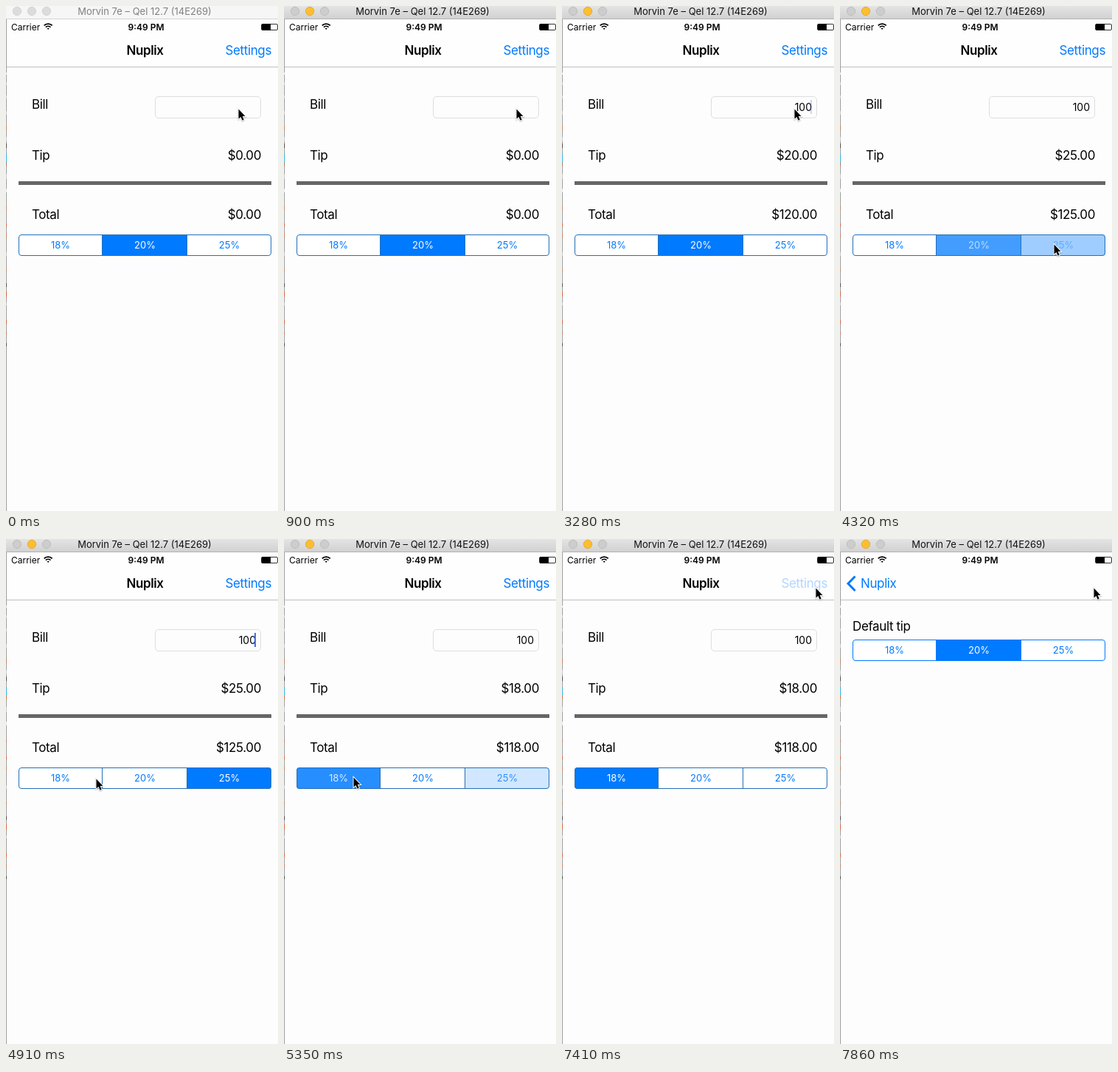
Write an HTML page with a canvas that moves like this. It is 369 px wide and 683 px high and loops after 8 s.

```html
<!DOCTYPE html>
<html lang="en">
<head>
<meta charset="utf-8">
<title>Tip calculator</title>
<style>
  html, body { margin: 0; width: 100%; height: 100%; overflow: hidden; background: #fefefe; }
  canvas { display: block; width: 369px; height: 683px; }
</style>
</head>
<body>
<canvas id="stage"></canvas>
<script>
const W = 369, H = 683, LOOP = 8000;
const BLUE = '#007aff', APP = 'Nuplix';
const FOCUS = 900, TICK = 148.2;
const RATES = [18, 20, 25];
const KEYS = [2220, 2520, 2670];
const TAPS = [{ at: 4243, pick: 2 }, { at: 5141, pick: 0 }];
const PUSH = 7571;

// Each move is a curve from the previous resting place through a bend.
const HOME = [315, 139];
const MOVES = [
  { at: 3420, ms: 440, bend: [235, 240], to: [290, 322] },
  { at: 4460, ms: 580, bend: [190, 331], to: [94, 322] },
  { at: 5494, ms: 870, bend: [400, 120], to: [344, 66] }
];

const canvas = document.getElementById('stage');
const ctx = canvas.getContext('2d');
const dpr = window.devicePixelRatio || 1;
canvas.width = W * dpr;
canvas.height = H * dpr;

const clamp = v => Math.min(1, Math.max(0, v));
const smooth = p => p * p * (3 - 2 * p);

// The screen refreshes at a slow, even rate.
const sample = t => FOCUS + TICK * Math.floor((t - FOCUS + 15) / TICK);

function caretAlpha(t) {
  if (t < 1190) return 0;
  if (t > KEYS[0] && t < 3100) return 1;
  const peak = t < KEYS[0] ? 1200 : 2950;
  return clamp(.75 + 1.1 * Math.cos((t - peak) / 1004 * 2 * Math.PI));
}

function cursorAt(t) {
  let pos = HOME;
  for (const { at, ms, bend, to } of MOVES) {
    const p = smooth(clamp((t - at) / ms)), q = 1 - p;
    pos = pos.map((v, i) => q * q * v + 2 * p * q * bend[i] + p * p * to[i]);
  }
  return pos.map(Math.round);
}

function segmentLevels(t) {
  let levels = [0, 1, 0];
  for (const { at, pick } of TAPS) {
    if (t < at - 90) break;
    const p = clamp((t - at) / 250);
    levels = levels.map((v, i) => i === pick ? .15 + .85 * p : v * (1 - p));
  }
  return levels;
}

function tipRate(t) {
  const done = TAPS.filter(tap => t >= tap.at);
  return RATES[done.length ? done[done.length - 1].pick : 1];
}

function rect(x, y, w, h, color) {
  ctx.fillStyle = color;
  ctx.fillRect(x, y, w, h);
}

function box(x, y, w, h, r, stroke) {
  ctx.beginPath();
  ctx.roundRect(x + .5, y + .5, w - 1, h - 1, r);
  ctx.strokeStyle = stroke;
  ctx.lineWidth = 1;
  ctx.stroke();
}

function text(str, x, y, { size = 17, weight = 400, align = 'left', color = '#000', track = -.38 } = {}) {
  ctx.font = `${weight} ${size}px Inter, "Open Sans", sans-serif`;
  ctx.letterSpacing = track + 'px';
  ctx.textAlign = align;
  ctx.fillStyle = color;
  ctx.fillText(str, x, y);
}

function titleBar(active) {
  const g = ctx.createLinearGradient(0, 0, 0, 17);
  g.addColorStop(0, active ? '#e4e4e4' : '#f6f6f6');
  g.addColorStop(1, active ? '#d1d1d1' : '#f6f6f6');
  rect(0, 0, W, 17, g);
  rect(0, 17, W, 1, active ? '#b3b3b3' : '#d4d4d4');
  for (let i = 0; i < 3; i++) {
    const lit = active && i === 1;
    ctx.beginPath();
    ctx.arc(15 + 20 * i, 7, 5.7, 0, 7);
    ctx.fillStyle = lit ? '#fdbe2f' : active ? '#cdcdcd' : '#dcdcdc';
    ctx.fill();
    ctx.strokeStyle = lit ? '#e0a32c' : active ? '#b9b9b9' : '#cfcfcf';
    ctx.lineWidth = .8;
    ctx.stroke();
  }
  text('Morvin 7e – Qel 12.7 (14E269)', 188, 12,
    { size: 13, align: 'center', color: active ? '#111' : '#808080', track: 0 });
}

function desktopEdge() {
  rect(0, 18, 1, H - 18, '#a0a0a0');
  const colors = ['#d9683c', '#c9825e', '#555', '#c8c8c8', '#e8e8e8'];
  let seed = 7;
  const random = () => (seed = seed * 16807 % 2147483647) / 2147483647;
  for (let y = 90; y < 470; y += 8 + random() * 18) {
    rect(0, Math.round(y), 1, 3 + Math.round(random() * 4), colors[Math.floor(random() * 5)]);
  }
  rect(0, 200, 1, 12, '#35b3dc');
}

function statusBar() {
  text('Carrier', 7, 32.5, { size: 12, track: 0 });
  text('9:49 PM', 190, 32.5, { size: 12, weight: 600, align: 'center', track: 0 });
  ctx.strokeStyle = '#000';
  ctx.lineWidth = 1.8;
  for (const r of [1.2, 4.7, 7.8]) {
    ctx.beginPath();
    ctx.arc(57.2, 32, r, -Math.PI * .75, -Math.PI * .25);
    ctx.stroke();
  }
  box(346, 24, 23, 9, 1.5, '#333');
  rect(347, 24, 12, 9, '#000');
}

function segments(x, y, levels, border) {
  const mid = [57, 171.5, 286], left = [0, 114, 229, 343];
  ctx.save();
  ctx.beginPath();
  ctx.roundRect(x, y, 343, 29, 4);
  ctx.clip();
  rect(x, y, 343, 29, '#fff');
  levels.forEach((a, i) => {
    rect(x + left[i], y, left[i + 1] - left[i], 29, `rgba(0, 122, 255, ${a})`);
    if (i) rect(x + left[i] - 1, y, 1, 29, border);
  });
  ctx.restore();
  box(x, y, 343, 29, 3.5, border);
  levels.forEach((a, i) => {
    text(RATES[i] + '%', x + mid[i], y + 19,
      { size: 13, align: 'center', color: `rgb(${255 * a}, ${122 + 133 * a}, 255)`, track: 0 });
  });
}

function calculator(t) {
  text(APP, 188.5, 66, { weight: 600, align: 'center' });
  ctx.globalAlpha = t >= 7260 ? .3 : 1;
  text('Settings', 360, 66, { align: 'right', color: BLUE });
  ctx.globalAlpha = 1;

  const bill = '100'.slice(0, KEYS.filter(k => t >= k).length);
  const tip = bill * tipRate(t) / 100;
  const row = (label, y, amount) => {
    text(label, 35, y);
    if (amount !== undefined) text('$' + amount.toFixed(2), 346, y, { align: 'right' });
  };
  row('Bill', 139);
  row('Tip', 208, tip);
  row('Total', 288, +bill + tip);

  box(202, 122, 144, 30, 4.5, '#dedede');
  text(bill, 339, 142, { size: 14, align: 'right', track: 0 });
  rect(337, 127, 2, 19, `rgba(66, 107, 242, ${caretAlpha(t)})`);

  rect(17, 237, 343, 5, '#666');
  segments(17, 309, segmentLevels(t), '#2470b8');
}

function settings(t) {
  const dx = Math.round(370 * (1 - clamp((t - PUSH) / 190)) ** 3);
  rect(1, 83, dx, H - 83, '#e4e4e4');
  ctx.beginPath();
  ctx.moveTo(20.5, 50.5);
  ctx.lineTo(11, 60.2);
  ctx.lineTo(20.5, 70);
  ctx.strokeStyle = BLUE;
  ctx.lineWidth = 3;
  ctx.stroke();
  text(APP, 28 + dx * .4, 66, { color: BLUE });
  text('Default tip', 17 + dx, 124);
  segments(17 + dx, 136, [0, 1, 0], BLUE);
}

function pointer(x, y) {
  ctx.save();
  ctx.translate(x + .5, y + .5);
  const arrow = new Path2D('M0 0V13L3 10.4L5.1 15.2L7.2 14.2L5.2 9.6H9Z');
  ctx.shadowColor = 'rgba(0, 0, 0, .3)';
  ctx.shadowBlur = 1.5 * dpr;
  ctx.shadowOffsetY = .7 * dpr;
  ctx.strokeStyle = '#fff';
  ctx.lineWidth = 2;
  ctx.stroke(arrow);
  ctx.shadowColor = 'transparent';
  ctx.fillStyle = '#000';
  ctx.fill(arrow);
  ctx.restore();
}

function draw(t) {
  ctx.setTransform(dpr, 0, 0, dpr, 0, 0);
  rect(0, 0, W, H, '#fdfdfd');
  rect(0, 18, W, 64, '#fefefe');
  rect(1, 82, W - 1, 1, '#c0c0c0');
  desktopEdge();
  titleBar(t >= FOCUS);
  statusBar();
  if (t < PUSH) calculator(t);
  else settings(t);
  pointer(...cursorAt(t));
}

const start = performance.now();
function loop() {
  draw(sample((performance.now() - start) % LOOP));
  requestAnimationFrame(loop);
}
loop();
</script>
</body>
</html>
```
